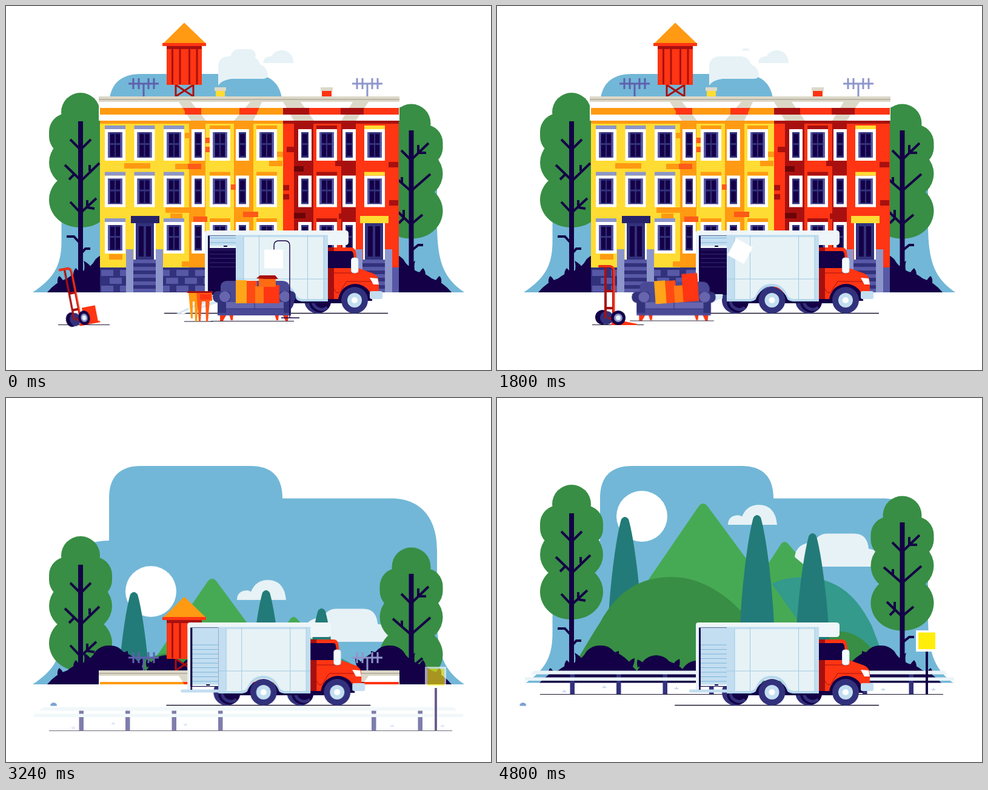
Animation of 800 by 600 pixels, one loop 4.84 s. Source, as an HTML page:

```html
<!DOCTYPE html>
<html lang="en">
<head>
<meta charset="utf-8">
<title>Moving day</title>
<style>
html,body{margin:0;width:100%;height:100%;overflow:hidden;background:#fff}
svg{display:block;width:100%;height:100%}
.a{animation:4840ms linear infinite}
#city{animation-name:sink}
@keyframes sink{0%,54.9%{transform:none;animation-timing-function:cubic-bezier(.333,0,.667,.333)}69.59%,100%{transform:translateY(445px)}}
#drift{animation-name:drift}
@keyframes drift{to{transform:translateX(17.9px)}}
#puff{animation-name:puff;transform-origin:391px 84px}
@keyframes puff{0%{transform:none}24.79%{transform:translate(18px,-10px) scale(.37,.32)}50.41%{transform:translate(20px,-11px) scale(.25,.22)}60%,100%{transform:translate(21px,-11px) scale(0)}}
#trees{animation-name:trees}
@keyframes trees{0%,54.9%{transform:none;animation-timing-function:cubic-bezier(.333,0,.667,.333)}66.12%{transform:translateY(130px);animation-timing-function:cubic-bezier(.2,.7,.4,1)}73.55%,100%{transform:none}}
#hills{animation-name:hills}
@keyframes hills{0%,64.46%{transform:translateY(322px);animation-timing-function:cubic-bezier(.25,.6,.35,1)}73.55%,100%{transform:none}}
#road{animation-name:road}
@keyframes road{0%,66.9%{opacity:0;transform:translateY(60px)}67%{opacity:1;transform:translateY(60px);animation-timing-function:ease-out}73.55%,100%{opacity:1;transform:none}}
#truck{animation-name:drive}
@keyframes drive{0%,61.98%{transform:none;animation-timing-function:cubic-bezier(.364,0,.636,1)}71.07%{transform:translateX(-50px);animation-timing-function:cubic-bezier(.364,0,.636,1)}90.08%,100%{transform:none}}
#door{animation-name:door}
@keyframes door{0%,53.72%{transform:none;animation-timing-function:cubic-bezier(.364,0,.636,1)}62.81%,100%{transform:translateY(77px)}}
#scrap{animation-name:scrap}
@keyframes scrap{0%,46.2%{opacity:0}46.3%,100%{opacity:1}}
#ramp{animation-name:ramp;transform-origin:372px 478px}
@keyframes ramp{0%,60.5%{transform:none}62.5%,100%{transform:scale(0)}}
#bar{animation-name:bar}
@keyframes bar{0%,62.2%{opacity:0}62.6%,100%{opacity:1}}
#line{animation-name:line;transform-origin:630px 506px}
@keyframes line{0%,60.5%{transform:none}62.5%,100%{transform:scaleX(.913)}}
#stone1{animation-name:stone1}
@keyframes stone1{0%,64.04%{opacity:0;transform:translateX(524.7px)}64.05%{opacity:1;transform:translateX(524.7px)}100%{opacity:1;transform:translateX(31.7px)}}
#stone2{animation-name:stone2}
@keyframes stone2{0%,63.9%{opacity:0;transform:translateX(119px)}64%{opacity:1;transform:translateX(119px)}71.07%{opacity:1;transform:translateX(22.6px)}71.1%,100%{opacity:0;transform:translateX(22.6px)}}
#cart{animation-name:cart;transform-origin:200px 514px}
@keyframes cart{0%{transform:translateX(-71px);animation-timing-function:ease-in-out}19%,61.98%{transform:none;animation-timing-function:ease-in}67%,100%{transform:scale(0)}}
#tilt{animation-name:tilt;transform-origin:200px 514px}
@keyframes tilt{0%{transform:rotate(-11deg) scaleX(.8);animation-timing-function:ease-in-out}15%{transform:rotate(-11deg) scaleX(.85);animation-timing-function:ease-out}22.7%,100%{transform:none}}
#crate{animation-name:crate;transform-origin:213px 511px}
@keyframes crate{0%,26.5%{transform:none;animation-timing-function:ease-in}28%{transform:scale(1.1,.85);animation-timing-function:ease-out}31.5%{transform:translate(75px,-85px) scale(.7) rotate(60deg);animation-timing-function:ease-in}34.7%{opacity:1;transform:translate(143px,-55px) scale(.3) rotate(110deg)}34.8%,100%{opacity:0;transform:translate(143px,-55px) scale(.3)}}
#desk{animation-name:desk;transform-origin:320px 500px}
@keyframes desk{0%,1%{transform:none;animation-timing-function:ease-out}6%{transform:translate(10px,-60px) scale(.8);animation-timing-function:ease-in}11.5%{opacity:1;transform:translate(37px,-48px) scale(.22)}11.6%,100%{opacity:0;transform:translate(37px,-48px) scale(.2)}}
#sofa{animation-name:sofa;transform-origin:410px 500px}
@keyframes sofa{0%,2%{transform:none;animation-timing-function:ease-in-out}19%,36.5%{transform:translate(-118px,-1px)}39%{transform:translate(-118px,3px) scale(1.04,.9);animation-timing-function:ease-out}42.6%{transform:translate(-82px,-70px) scale(.65) rotate(8deg);animation-timing-function:ease-in}46.2%{opacity:1;transform:translate(-53px,-50px) scale(.24)}46.3%,100%{opacity:0;transform:translate(-53px,-50px) scale(.2)}}
#load{animation-name:load;transform-origin:415px 467px}
@keyframes load{0%,2%{transform:none;animation-timing-function:ease-in-out}19%,38%{transform:translate(-119px,-1px) rotate(-4deg);animation-timing-function:ease-in-out}46%{transform:translate(-130px,-30px) scale(.7);animation-timing-function:ease-in}50.41%{transform:translate(-141.5px,-8px) scale(.52)}54.5%{opacity:1;transform:translate(-56px,-14px) scale(.2)}54.6%,100%{opacity:0;transform:translate(-56px,-14px) scale(.2)}}
#lid{animation-name:lid;transform-origin:431px 463px}
@keyframes lid{0%,4%{transform:none}19%,100%{transform:scaleY(0)}}
#tall{animation-name:tall;transform-origin:431px 490px}
@keyframes tall{0%,4%{transform:none}19%,100%{transform:scaleY(1.55)}}
.shade{animation-name:shade;transform-origin:441.5px 417px}
@keyframes shade{0%,10%{transform:none;animation-timing-function:ease-in-out}24.79%{transform:translate(-3.5px,37px) rotate(10deg)}30%{transform:translate(-5px,44px) rotate(14deg);animation-timing-function:ease-out}40%{transform:translate(-45px,-20px) rotate(30deg);animation-timing-function:ease-in}50.41%{transform:translate(-79.5px,15px) rotate(45deg)}54%,100%{transform:translate(-79.5px,75px) rotate(60deg)}}
#front{animation-name:front}
@keyframes front{0%,47.9%{opacity:1}48%,100%{opacity:0}}
#stem{animation-name:stem;transform-origin:468px 514px}
@keyframes stem{0%,10%{opacity:1;transform:none;animation-timing-function:ease-in}20%{opacity:1;transform:scaleY(.8)}20.1%,100%{opacity:0;transform:scaleY(.8)}}
#spring{animation-name:spring;transform-origin:468px 514px}
@keyframes spring{0%,20%{opacity:0;transform:scaleY(1.15)}20.1%{opacity:1;transform:scaleY(1.15)}24.79%{opacity:1;transform:none}30%{opacity:1;transform:scaleY(.9);animation-timing-function:ease-in}34%{opacity:1;transform:scaleY(0)}34.1%,100%{opacity:0;transform:scaleY(0)}}
</style>
</head>
<body>
<svg viewBox="0 0 800 600">
<defs>
<clipPath id="ground"><path d="M0 0H800V472H0Z"/></clipPath>
<clipPath id="hold"><path d="M336 379H379V475H336Z"/></clipPath>
<g id="crown" fill="#388e44"><circle cx="123" cy="175" r="32"/><rect x="71" y="177" width="104" height="68" rx="30"/><rect x="71" y="218" width="104" height="80" rx="40"/><rect x="71" y="274" width="104" height="91" rx="50" ry="46"/></g>
<path id="fir" d="M-28 182C-25 110-14 30-6 4q6-8 12 0C14 30 25 110 28 182Z" fill="#227b78"/>
<g id="bush" fill="#140047">
  <path d="M68 472Q82 455 101 449Q112 440 124 438Q140 432 148 417Q158 407 171 408Q184 407 193 418Q214 426 224 443Q238 455 240 472Z"/>
  <path d="M85 458q-1-10 3-13q7 6 8 13M111 444q0-8 4-12q7 6 8 13M128 440q3-12 0-20q12 6 15 16M192 422q3-4 9-5q1 10-4 16M217 436q4-6 10-7q0 9-4 15"/>
</g>
<g id="wheel"><circle r="22" fill="#32317c"/><circle r="12" fill="#c3def0"/><circle r="5" fill="#fff"/></g>
<g id="far"><circle r="22" fill="#32317c"/><circle cx="4" cy="2" r="18" fill="#140047"/><path d="M-8 2a15 15 0 0 0 24 10" fill="none" stroke="#32317c" stroke-width="5"/></g>
<path id="stone" d="M-5.500 507.500a5.500 5.500 0 0 1 11 0Z" fill="#7ca0d4"/>
</defs>

<path fill="#72b7d7" d="M44 472C77 450 91.500 430 91.500 388V300C91 260 120 236 170 235V165Q170 112 223 112H403Q456 112 456 165.500H634C690 165 711 205 711 250V360C711 425 724 450 756 472Z"/>

<g clip-path="url(#ground)">
  <g id="hills" class="a">
    <circle cx="239" cy="195" r="42" fill="#fff"/>
    <path d="M381 209q0-14 14-15.500q5-1 9 2q8-19 27-19.500q28 0 31 33Z" fill="#e7f2f6"/>
    <path d="M205 365L333 178q7-8 14 0L485 365ZM400 345L469 240q5-6 11 0L540 310V400H455Z" fill="#46aa54"/>
    <path d="M491 262q3-24 32-24q6-14 22-14.500h44q22 0 24 25q23 3 27 29.500H510Z" fill="#e7f2f6"/>
    <use href="#fir" x="211" y="196"/>
    <path d="M453 306Q485 291 525 297C575 305 600 340 618 375L655 472H500V372Z" fill="#339a8c"/>
    <path d="M453 306L500 372V410H400Z" fill="#46aa54"/>
    <path d="M110 472Q144 410 170 370C200 315 240 295 288 295C345 295 392 335 420 372L500 472ZM480 472Q510 385 567 384.500Q618 388 650 472Z" fill="#388e44"/>
    <use href="#fir" x="429" y="193"/><use href="#fir" x="520.500" y="223"/>
  </g>
  <g id="trees" class="a">
    <use href="#crown"/><use href="#crown" x="545.500" y="18.500"/>
    <path d="M123 190V490M668.500 205V490" stroke="#140047" stroke-width="8"/>
    <g fill="none" stroke="#140047" stroke-width="4">
      <path d="M106 220l17 17 17-17M97 262l27 26 30-29M104 286l10-10M138 262v10M106 323l17 18 26-24M134 320v12l12 2M100 380h12l11 12M139 400h-8l-8 9"/>
      <path d="M652 238l16 16 29-28M680 229v13h13M638 279l30 26 32-28M653 282v10M643 336l25 24 19-16M656 336v13M648 358l10-10M688 394h-8l-11 9"/>
    </g>
  </g>
  <use href="#bush"/><use href="#bush" transform="translate(803 0) scale(-1 1)"/>
  <path d="M215 472Q232 450 241 434Q250 424 263 424Q277 425 284 434Q300 440 306 447Q318 428 345 434V472ZM232 444q-2-8 0-13q8 3 11 9M290 440q5-8 11-10q2 10-2 15" fill="#140047"/>
  <g id="city" class="a">
    <g fill="#e7f2f6">
      <path d="M350 131V101Q350 83 368 83H404Q415 84 419 96Q430 100 432 113Q432 120 424 120H372Q356 122 350 131Z"/>
      <path id="puff" class="a" d="M370 84q3-13 16-13h14q12 0 12 13z"/>
      <path id="drift" class="a" d="M424 94q1-11 14-11q5-10 17-10q18 1 19.500 21Z"/>
    </g>
    <path d="M280 129V150M309 129V150M280 149L309 130M280 130L309 149" stroke="#a8100f" stroke-width="3"/>
    <path d="M265 66H323V130H265Z" fill="#ff3513"/>
    <path d="M274.500 66V129M287 66V129M302.500 66V129M315 66V129" stroke="#a8100f" stroke-width="3"/>
    <path d="M265 66H323V71H265Z" fill="#a8100f"/>
    <path d="M294 27.500L330 62H259Z" fill="#ff9a12"/><path d="M258 61H330V66H258Z" fill="#ff3513"/>
    <g fill="none" stroke-width="3"><path id="aerial" d="M202 128H252M227 128V150M210 119V137M219 119V137M235 119V137M244 119V137"/></g>
    <path d="M346 139H361V150H346Z" fill="#ffdc33"/><path d="M521 139H537V150H521Z" fill="#ff3513"/>
    <path d="M344 134H363V140H344ZM519 134H539V140H519Z" fill="#dcd8c8"/>
    <use href="#aerial" stroke="#5f60ae" stroke-width="3"/><use href="#aerial" x="369" stroke="#8d96cb" stroke-width="3"/>
    <g id="house"></g>
  </g>
</g>

<g id="road" class="a">
  <path d="M40 469.500H762V474H40Z" fill="#fff"/>
  <path d="M120.500 450h7.500v38h-7.500zM197 450h7.500v38H197zM273.500 450h7.500v38h-7.500zM350 450h7.500v38H350zM603 450h7.500v38H603zM679.500 450h7.500v38h-7.500z" fill="#32317c"/>
  <path d="M62 449.500H738L744 455.500H54ZM46 460.500H754V466H46Z" fill="#eaf4f8"/>
  <path d="M71 488.500H736" stroke="#1b1630" stroke-width="1.200"/>
  <path d="M707 416H711V488H707Z" fill="#140047"/><path d="M691 383H726V418H691Z" fill="#fff"/><path d="M695 386.500H723V414H695Z" fill="#ffee0a"/>
  <path id="tufts" fill="none" stroke="#9ab0dd"/>
</g>

<g id="stone1" class="a"><use href="#stone"/></g><g id="stone2" class="a"><use href="#stone"/></g>

<g id="truck" class="a">
  <path id="line" class="a" d="M261 506.500H630" stroke="#1b1630" stroke-width="1.300"/>
  <use href="#far" x="393" y="485"/><use href="#far" x="514" y="485"/>
  <path d="M400 478H580V490H410Z" fill="#140047"/>
  <path d="M332 377H380V476H332Z" fill="#140047"/>
  <g clip-path="url(#hold)">
    <path id="dark" stroke="#32317c"/>
    <path id="scrap" class="a" d="M365 466L376 464V476H369Z" fill="#ff3513"/>
    <rect class="a shade" x="426" y="401.500" width="31" height="31" fill="#9296c8"/>
    <g id="door" class="a"><path d="M336 300H379V399H336Z" fill="#c3def0"/><path id="slats" stroke="#7bb6dc"/><path d="M336 395H379V399H336Z" fill="#e7f2f6"/><path d="M359 396h6" stroke="#140047" stroke-width="2"/></g>
  </g>
  <path d="M328 375H333V483H328Z" fill="#e7f2f6"/>
  <g id="ramp" class="a"><path d="M281 507L345 475H372V482L294 507Z" fill="#d3e7f2"/><path d="M290 507L358 479M301 498l10 3M313 492l10 3M325 486l10 3M337 480l10 3" stroke="#fff" stroke-width="2.500"/></g>
  <rect id="bar" class="a" x="317" y="480.500" width="64" height="5" rx="2.500" fill="#c3def0"/>
  <path d="M531 398H569Q576 398 577 406L581 432L606 441Q615 445 615 456V472H598V483H531Z" fill="#ff3513"/>
  <path d="M531 398H541V483H531Z" fill="#a8100f"/><path d="M531 404H569Q572 404 573 409L576 432H531Z" fill="#140047"/>
  <path d="M541 440H580M541 466Q547 481 556 463L562 454H612" fill="none" stroke="#a8100f"/>
  <path d="M548 486a28 28 0 0 1 56 0Z" fill="#140047"/>
  <path d="M600 448L613 449L615 459H606Z" fill="#fff"/><rect x="600" y="470" width="21" height="13" rx="3" fill="#c3def0"/>
  <path d="M379 377H531V485H488Q479 484 476 475Q469 462 453 462Q437 462 430 475Q427 484 418 485H379Z" fill="#e7f2f6"/>
  <path d="M379 377H392V485H379ZM524 377H531V485H524ZM379 377H531V381H379Z" fill="#c3def0"/>
  <path d="M379 485H418Q427 484 430 475Q437 460 453 460Q469 460 476 475Q479 484 488 485H531" fill="none" stroke="#b5d8ec" stroke-width="4"/>
  <path d="M392 380V482M417.500 378V484M497.500 378V484M524 378V484M379 450H531" stroke="#9fcbe2"/>
  <path d="M426 486Q432 465 453 465Q474 465 480 486Z" fill="#140047"/>
  <path d="M328 378V374Q328 370 332 370H560Q565 370 565 375V389Q565 394 560 394H531V378Z" fill="#eef6f9"/>
  <path d="M333 378H531" stroke="#b5d8ec"/><path d="M334.500 379V481" stroke="#140047" stroke-width="2.500"/>
  <rect x="569.500" y="415" width="11.500" height="25" rx="4" fill="#f4fafc" stroke="#c3def0"/>
  <use href="#wheel" x="453.500" y="485"/><use href="#wheel" x="575" y="485"/>
</g>

<g id="desk" class="a">
  <path d="M294 520H341" stroke="#1b1630"/>
  <path d="M301 471H320V486H317L315 520H312L311 487H308V515H305Z" fill="#ff9a12"/>
  <path d="M314 471H340V486H336L333 520H330L329 487H323L321 520H318Z" fill="#ff5a18"/><path d="M299 470H341V473H299Z" fill="#a8100f"/><path d="M320 475H338V484H320Z" fill="#ff3513"/>
</g>

<g id="sofa" class="a">
  <path d="M338 519.500H475" stroke="#1b1630"/>
  <path d="M353 508H364L358 519H353ZM368 508H375L374 518H371ZM443 508H450L449 518H446ZM456 508H466L465 519H461Z" fill="#ff3513"/>
  <path d="M354 462Q355 453 366 453H456Q466 453 468 463V495H354Z" fill="#4a4996"/>
  <path d="M410 455V490" stroke="#32317c"/>
  <path d="M349 488H470V510H349Z" fill="#4a4996"/><path d="M358 488H463V499H358Z" fill="#6665ad"/><path d="M349 499H470M410 488V499" stroke="#32317c"/>
  <path d="M341 479q0-9 9-9h14q7 0 7 9t-8 9V506h-14V489q-8-2-8-10ZM478 479q0-9-9-9h-12q-7 0-7 9t8 9V506h12V489q8-2 8-10Z" fill="#32317c"/>
  <circle cx="361" cy="479" r="9" fill="#6665ad"/><circle cx="460" cy="479" r="9" fill="#6665ad"/>
</g>
<g id="load" class="a">
  <path d="M379 452H397V490H379Z" fill="#ffa51a"/><path d="M397 453H414V490H397Z" fill="#ff4a14"/><path d="M411 462H427V490H411Z" fill="#ff7a14"/><path id="tall" class="a" d="M425 460H451V490H425Z" fill="#ff3513"/>
  <g id="lid" class="a"><path d="M417 449H445V463H417Z" fill="#ff6a14"/><path d="M413 449L419 444H444L449 450H428Z" fill="#a8100f"/></g>
</g>

<g id="cart" class="a">
  <path d="M157 525.500H242" stroke="#1b1630"/>
  <g id="tilt" class="a">
    <circle cx="174" cy="513" r="12" fill="#140047"/><circle cx="181" cy="514" r="11" fill="#32317c"/>
    <path d="M179 515V430M192 519V436Q192 429 184 429H168M179 470H192M179 498H192M184 514L200 519" fill="none" stroke="#a8100f" stroke-width="4"/>
    <path d="M193 519V436Q193 429 185 429H167" fill="none" stroke="#ff3513" stroke-width="3"/>
    <path d="M190 518L206 519L231 524V526H188Z" fill="#ff3513"/>
    <path id="crate" class="a" d="M199 497H227V524H199Z" fill="#ff3513"/>
    <circle cx="200" cy="514" r="12" fill="#140047"/><circle cx="200" cy="514" r="7" fill="#8d96cb"/><circle cx="200" cy="514" r="4" fill="#e7f2f6"/>
  </g>
</g>

<g id="front" class="a">
  <g fill="none" stroke="#140047" stroke-width="1.400">
    <path id="stem" class="a" d="M454 514H484M468 514V395Q468 387 460 387H450Q442 387 442 395V402"/>
    <path id="spring" class="a" d="M454 514H484M468 514V492L460 488L477 483L460 478L474 473L468 470V433Q468 425 460 425H450Q442 425 442 433V440"/>
  </g>
  <rect class="a shade" x="426" y="401.500" width="31" height="31" fill="#fff"/>
</g>
</svg>
<script>
const Y = '#ffdc33', O = '#ff9a12', R = '#ff3513', D = '#a8100f', M = '#6b0508',
  N = '#140047', I = '#32317c', P = '#5759a6', L = '#8d96cb', W = '#fff', B = '#dcd8c8';
const id = n => document.getElementById(n);
const rect = (x, y, w, h, c) => `<path d="M${x} ${y}h${w}v${h}h${-w}z" fill="${c}"/>`;

const win = (x, y, w, lintel) => {
  let s = rect(x, y, w, 52, W) + rect(x + 5, y + 5, w - 10, 42, I);
  if (lintel) s += rect(x, y - 6, w, 6, lintel);
  if (w < 30) return s + rect(x + 7, y + 8, w - 14, 15, N) + rect(x + 7, y + 26, w - 14, 18, N);
  s += rect(x + 5, y + 5, 3, 42, P) + rect(x + w - 8, y + 5, 3, 42, P);
  for (const dx of [9, 18]) s += rect(x + dx, y + 8, 7, 15, N) + rect(x + dx, y + 26, 7, 19, N);
  return s;
};

const entry = (x, lintel) => {
  let s = rect(x - 18, 357, 36, 62, W) + rect(x - 15, 358, 30, 60, I)
    + rect(x - 10, 363, 8, 50, N) + rect(x + 2, 363, 8, 50, N)
    + rect(x - 23, 346, 47, 12, lintel);
  for (let i = 0; i < 9; i++) s += rect(x - 20, 418 + i * 6, 40, 6, i % 2 ? I : P);
  return s + rect(x - 31, 401, 12, 71, L) + rect(x + 18, 401, 12, 71, L);
};

let s = '';
// Consecutive bands given as [left edge, colour], closed by a last edge
const bands = (y, h, list) => list.slice(0, -1)
  .map(([x, c], i) => rect(x, y, list[i + 1][0] - x, h, c)).join('');
s += bands(188, 284, [[155, Y], [302, O], [329, Y], [376, O], [408, Y],
  [457, R], [475, D], [507, R], [553, D], [577, R], [648]]);
s += bands(189, 5, [[155, O], [457, D], [648]]);

const bricks = {
  [O]: [295, 209, 10, 195, 259, 43, 279, 260, 22, 434, 255, 22, 447, 240, 10, 263, 332, 42, 271, 342, 20, 170, 409, 22, 290, 421, 15],
  '#ff5a18': [329, 217, 7, 329, 232, 7, 300, 260, 22, 309, 347, 23, 391, 339, 25, 371, 294, 8],
  [D]: [463, 232, 18, 543, 255, 23, 631, 257, 16, 457, 295, 10, 457, 310, 10, 549, 342, 20, 632, 320, 15],
  [M]: [475, 264, 16, 475, 341, 19]
};
for (const c in bricks)
  for (let i = 0, b = bricks[c]; i < b.length; i += 3) s += rect(b[i], b[i + 1], b[i + 2], 9, c);

// Stone base
s += bands(431, 41, [[155, I], [457, R], [577, P], [648]]);
for (let row = 0; row < 3; row++)
  for (let x = 157 + row % 2 * 14; x < 440; x += 31) s += rect(x, 435 + row * 13, 20, 10, P);

for (let row = 0; row < 3; row++) {
  const y = 203 + row * 76.5;
  for (const x of [163, 211.5, 260]) if (row < 2 || x !== 211.5) s += win(x, y, 34, L);
  for (const x of [306, 379, 482, 555]) s += win(x, y, 22);
  s += win(336, y, 34, O) + win(413, y, 34, O) + win(512, y, 34, D);
  if (row < 2) s += win(591, y, 34, Y);
}
s += entry(229, '#26236a') + entry(607, Y);

// Cornice with slanted bay shadows
s += rect(153, 149, 496, 40, W);
const slant = ([a, b, c, d], y0, y1, fill) => {
  const mix = (p, q, y) => p + (q - p) * (y - 158) / 31;
  return `<path d="M${mix(a, d, y0)} ${y0}H${mix(b, c, y0)}L${mix(b, c, y1)} ${y1}H${mix(a, d, y1)}Z" fill="${fill}"/>`;
};
const bays = [[285, 305, 330, 305], [403, 422, 408, 376], [457, 486, 508, 475], [572, 598, 577, 553]];
for (const bay of bays) s += slant(bay, 158, 189, B);
s += bands(168, 11, [[155, O], [457, R], [648]]);
bays.forEach((bay, i) => s += slant(bay, 168, 179, i < 2 ? R : D));
s += bands(168, 11, [[295, R], [322, O]]) + bands(168, 11, [[385, R], [414, O]])
  + bands(168, 11, [[457, D], [500, R]]) + bands(168, 11, [[552, D], [590, R]]);
s += rect(153, 149, 496, 9, B) + rect(153, 153, 496, 2, '#b9b4a6');
id('house').innerHTML = s;

const lines = (from, to, step) => {
  let d = '';
  for (let y = from; y < to; y += step) d += `M336 ${y}H379`;
  return d;
};
id('slats').setAttribute('d', lines(330, 395, 7.5));
id('dark').setAttribute('d', lines(402, 432, 7));
id('tufts').setAttribute('d', [[111, 485], [177, 478], [296, 480], [637, 482], [720, 482]]
  .map(([x, y]) => `M${x - 3} ${y - 2}l2 2M${x} ${y - 4}v4M${x + 3} ${y - 2}l-2 2`).join(''));
</script>
</body>
</html>
```
